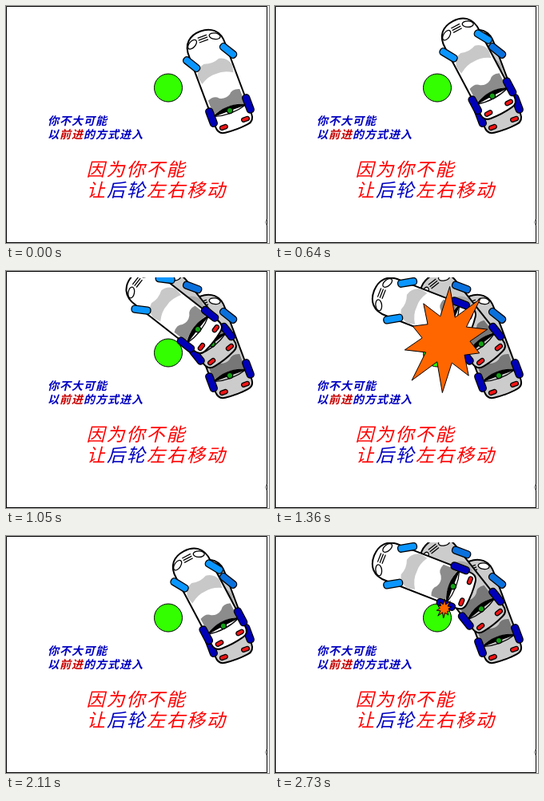
An HTML page that plays this animation: 329 by 297 pixels, repeating every 2.84 s.

```html
<!DOCTYPE html>
<html lang="zh-CN">
<head>
<meta charset="utf-8">
<title>倒车入位</title>
<style>
  html, body { margin: 0; width: 100%; height: 100%; overflow: hidden; background: #fff; }
  svg { display: block; width: 100%; height: 100%; }
  text { font-family: "Noto Sans CJK SC", "Noto Sans CJK", sans-serif; font-style: italic; white-space: pre; }
  .small { font-size: 14px; font-weight: 700; letter-spacing: 1px; }
  .large { font-size: 23px; font-weight: 500; letter-spacing: 2px; }
  .red { fill: #f00; }
  .small .red { fill: #c80000; }
  .blue { fill: #0000c0; }
  .car { stroke: #000; stroke-width: 1.3; --body: #fff; --front: #c8c8c8; --rear: #8c8c8c; --steer: #0a96ff; }
  .ghost { --body: #ccc; --front: #aaa; --rear: #777; --steer: #0a70dc; }
  .body { fill: var(--body); stroke-width: 2; }
  .windshield { fill: var(--front); stroke: none; }
  .rear-window { fill: var(--rear); stroke: none; }
  .steered { fill: var(--steer); }
</style>
</head>
<body>
<svg viewBox="0 0 329 297">
  <defs>
    <clipPath id="scene"><rect x="1" y="8" width="326" height="288"/></clipPath>
    <rect id="wheel" x="-4.5" y="-12" width="9" height="24" rx="4"/>
    <rect id="light" x="-5" y="-2.6" width="10" height="5.2" rx="2.4" fill="#f01414"/>
    <g id="car">
      <path class="body" d="M-24-80C-25-99-13-106 0-106S25-99 24-80V13Q24 23 15 24Q0 26-15 24Q-24 23-24 13Z"/>
      <path class="windshield" d="M-23-53Q-20-64-10-66Q0-62 10-66Q20-64 23-53L21-43Q10-50 0-49Q-10-50-21-43Z"/>
      <path class="rear-window" d="M-21-21Q-12-25-7-19Q0-15 7-19Q12-25 21-21V-2Q0-9-21-2Z"/>
      <g fill="#fff">
        <ellipse rx="7" ry="3.8" transform="translate(-15 -94) rotate(-28)"/>
        <ellipse rx="7" ry="3.8" transform="translate(15 -94) rotate(28)"/>
      </g>
      <path d="M-6-99H6M-6-96H6M-6-93H6" fill="none"/>
      <path d="M-22 0Q0-10 22 0Q0-1-22 0Z"/>
      <path d="M-22 0Q0 7 22 0" fill="none"/>
      <circle r="3.7" fill="#14a014"/>
      <g fill="#0000b9">
        <use href="#wheel" x="-24.5"/>
        <use href="#wheel" x="24.5"/>
      </g>
      <g class="steered">
        <use href="#wheel" transform="translate(-24.5 -71) rotate(-31)"/>
        <use href="#wheel" transform="translate(24.5 -71) rotate(-31)"/>
      </g>
      <use href="#light" x="-14.5" y="17"/>
      <use href="#light" x="14.5" y="17"/>
    </g>
  </defs>

  <rect width="329" height="297" fill="#fff"/>
  <g clip-path="url(#scene)">
    <circle cx="203" cy="102.5" r="17.5" fill="#3f0" stroke="#000"/>
    <use id="startGhost" class="car ghost" href="#car"/>
    <use id="middleGhost" class="car ghost" href="#car"/>
    <use id="mover" class="car" href="#car"/>
    <path id="crash" fill="#f60" stroke="#000"/>
  </g>

  <text class="small blue" x="52" y="148.5">你不大可能</text>
  <text class="small blue" x="52" y="165.5">以<tspan class="red">前进</tspan>的方式进入</text>
  <text class="large red" x="100.5" y="212.5">因为你不能</text>
  <text class="large red" x="101" y="238.5">让<tspan class="blue">后轮</tspan>左右移动</text>

  <path d="M.5 297V.5H326.5V297M0 296.5H327" fill="none" stroke="#000"/>
  <path d="M326 267Q323 271 326 275" fill="none" stroke="#888"/>
</svg>
<script>
  const LOOP = 2840;
  const TICK = 104;
  const MIDDLE = 4;
  const LAST = 8;
  const RAD = Math.PI / 180;

  const [startGhost, middleGhost, mover, crash] =
    ["startGhost", "middleGhost", "mover", "crash"].map(id => document.getElementById(id));

  // The rear axle rolls along the car's heading while the turn tightens.
  const heading = n => -(20.5 + 2.9 * n + 0.39 * n * n);
  const travel = n => 11.4 * n - 2.8 * Math.sin(Math.PI * n / 4);

  function pose(step) {
    let x = 280, y = 131;
    for (let n = 0; n < step; n++) {
      const angle = heading(n + 0.5) * RAD;
      const distance = travel(n + 1) - travel(n);
      x += distance * Math.sin(angle);
      y -= distance * Math.cos(angle);
    }
    return `translate(${x} ${y}) rotate(${heading(step)})`;
  }

  // Ten spikes, longest along one diagonal
  function starPath(scale) {
    const points = Array.from({ length: 20 }, (_, i) => {
      const angle = (-86 + 18 * i) * RAD;
      const spike = 57 + 12 * Math.cos(2 * (angle - 112 * RAD));
      const radius = scale * (i % 2 ? 30 : spike);
      const x = 211 + 3 * scale + radius * Math.cos(angle);
      const y = 92 - 6 * scale + radius * Math.sin(angle);
      return `${x.toFixed(2)},${y.toFixed(2)}`;
    });
    return `M${points.join("L")}Z`;
  }

  // Steps past the last one enlarge the crash.
  function stepAt(time) {
    const ticksSince = start => Math.floor((time - start) / TICK);
    if (time < 100) return 0;
    if (time < 631) return 1;
    if (time < 1671) {
      const step = 2 + ticksSince(631);
      return step < 7 ? step : step + 1;
    }
    if (time < 2101) return 0;
    return Math.min(LAST, 2 + ticksSince(2101));
  }

  const show = (el, visible) => el.setAttribute("visibility", visible ? "visible" : "hidden");

  startGhost.setAttribute("transform", pose(0));
  middleGhost.setAttribute("transform", pose(MIDDLE));

  const origin = performance.now();

  function draw(now) {
    const step = stepAt(Math.max(0, now - origin) % LOOP);
    const growth = Math.max(0, step - LAST) / 2;
    mover.setAttribute("transform", pose(Math.min(step, LAST)));
    crash.setAttribute("d", starPath(0.18 + 0.82 * growth ** 0.75));
    show(startGhost, step > 0);
    show(middleGhost, step > MIDDLE);
    show(crash, step >= LAST);
    requestAnimationFrame(draw);
  }
  draw(origin);
</script>
</body>
</html>
```
